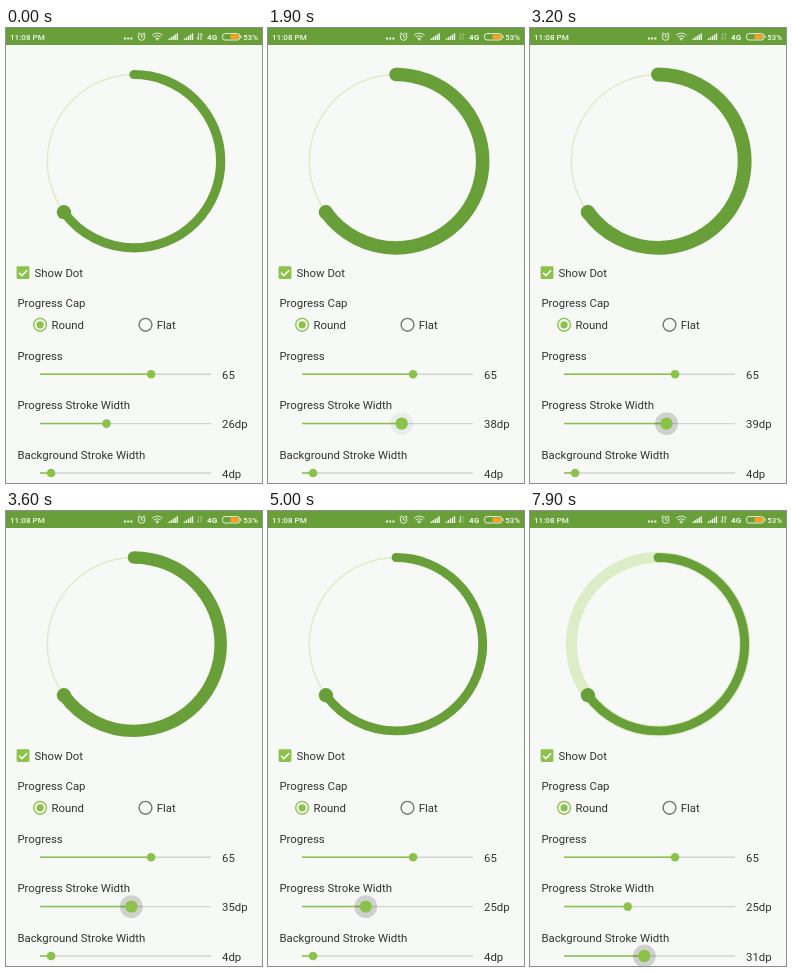
These frames come from a looping animation (256x455 px, 8000 ms). An HTML page:

```html
<!DOCTYPE html>
<html lang="en">
<head>
<meta charset="utf-8">
<title>Circular progress settings</title>
<style>
  html, body { margin: 0; width: 100%; height: 100%; overflow: hidden; background: #f7f9f6; }
  svg { display: block; width: 100vw; height: 100vh; }
  text { font: 11.38px Roboto, sans-serif; fill: #333; }
  .status text { font-size: 8.1px; font-weight: 500; fill: #f4f8ef; }
  .status .line { fill: none; stroke: #f4f8ef; stroke-width: 0.9; }
  .accent { fill: #8bc34a; }
  .line { fill: none; }
</style>
</head>
<body>
<svg viewBox="0 0 256 455">
  <g class="status">
    <rect width="256" height="17" fill="#689f38"/>
    <text x="4" y="11.6">11:08 PM</text>
    <path d="M118 10.5h2m1.2 0h2m1.2 0h2" class="line" style="stroke-width:1.8"/>
    <circle cx="135.6" cy="9" r="3.3" class="line"/>
    <path d="M135.6 7v2.2h1.6M131.6 6.2l2-1.6M139.6 6.2l-2-1.6" class="line"/>
    <path d="M146 7.2q5.3-4.2 10.6 0M147.7 9q3.6-2.8 7.2 0M149.4 10.7q1.9-1.5 3.8 0" class="line"/>
    <circle cx="151.3" cy="11.6" r="0.9" fill="#f4f8ef"/>
    <g id="signals" fill="#f4f8ef"></g>
    <path id="down" d="M192.4 5v6.5M190.9 9.8l1.5 1.9" class="line"/>
    <path id="up" d="M195 12V5.5M196.5 7.2l-1.5-1.9" class="line"/>
    <text x="201" y="11.6" style="font-weight:700">4G</text>
    <rect x="216.5" y="5.6" width="17.4" height="6.4" rx="2.4" class="line"/>
    <rect x="224.5" y="6.6" width="8.4" height="4.4" rx="1" fill="#ff9f1c"/>
    <path d="M235 7.5v2.6" class="line"/>
    <text x="237.3" y="11.5" style="font-size:7.8px">53%</text>
  </g>

  <g class="line" transform="rotate(-90 128 133.2)">
    <circle id="ringBack" cx="128" cy="133.2" r="86.7" stroke="#dcedc8"/>
    <circle id="ring" cx="128" cy="133.2" r="86.7" stroke="#689f38" pathLength="100"
      stroke-dasharray="65 100" stroke-linecap="round"/>
  </g>
  <circle cx="57.9" cy="184.2" r="7.1" fill="#689f38"/>

  <rect x="10.6" y="238.2" width="12.8" height="12.8" rx="1.4" class="accent"/>
  <path d="M13 244.7l2.9 2.9 5.3-5.4" class="line" stroke="#fff" stroke-width="1.5"/>
  <text x="28.5" y="249">Show Dot</text>
  <text x="11.4" y="279.3">Progress Cap</text>
  <circle cx="34.1" cy="296.8" r="6.4" class="line" stroke="#8bc34a" stroke-width="1.4"/>
  <circle cx="34.1" cy="296.8" r="3.6" class="accent"/>
  <text x="45.4" y="301">Round</text>
  <circle cx="139.5" cy="296.8" r="6.4" class="line" stroke="#737573" stroke-width="1.4"/>
  <text x="150.8" y="301">Flat</text>
  <g id="sliders"></g>
</svg>
<script>
const LOOP = 8000, TRACK_START = 34, TRACK_END = 205, STEP = 2.77, PX_PER_DP = 0.3556;
const $ = id => document.getElementById(id);
const clamp = x => Math.max(0, Math.min(1, x));

// Signal strength bars
for (const x of [162.5, 177.8])
  for (let i = 0; i < 5; i++) {
    const h = 1.5 + i * 1.3;
    $('signals').innerHTML += `<rect x="${x + i * 2}" y="${12 - h}" width="1.4" height="${h}"/>`;
  }

function makeSlider(label, y) {
  const group = document.createElementNS('http://www.w3.org/2000/svg', 'g');
  group.innerHTML = `
    <text x="11.4" y="${y - 14.4}">${label}</text>
    <path d="M${TRACK_START} ${y}H${TRACK_END}" stroke="#d2d4d1" stroke-width="1.4"/>
    <path stroke="#8bc34a" stroke-width="1.5"/>
    <circle cy="${y}" r="11.4" fill="#000"/>
    <circle cy="${y}" class="accent"/>
    <text x="216" y="${y + 4.6}"></text>`;
  $('sliders').append(group);
  const [, , filled, halo, thumb, value] = group.children;
  return (x, text, grow = 0, haloAlpha = 0) => {
    filled.setAttribute('d', `M${TRACK_START} ${y}H${x}`);
    halo.setAttribute('cx', x);
    halo.setAttribute('opacity', 0.16 * haloAlpha);
    thumb.setAttribute('cx', x);
    thumb.setAttribute('r', 4.3 + 1.9 * grow);
    value.textContent = text;
  };
}

const showProgress = makeSlider('Progress', 346.3);
const showStroke = makeSlider('Progress Stroke Width', 395.6);
const showBack = makeSlider('Background Stroke Width', 445);
showProgress(145.1, '65');

// [time, dp] pairs, linear in between
const strokeKeys = [[0, 26], [1699, 26], [1700, 37], [1900, 38], [2500, 41], [2700, 41],
  [3200, 39], [3600, 35], [3800, 34], [4200, 29], [4600, 26], [4800, 25], [LOOP, 25]];
const backKeys = [[0, 4], [7399, 4], [7400, 10], [7900, 31], [LOOP, 31]];

function valueAt(keys, t) {
  const i = keys.findIndex(([time]) => time > t);
  const [t0, v0] = keys[i - 1], [t1, v1] = keys[i];
  return Math.round(v0 + (v1 - v0) * (t - t0) / (t1 - t0));
}

function pressAt(t, down, up) {
  const fade = 1 - clamp((t - up) / 300);
  return [clamp((t - down) / 150) * fade, clamp((t - down - 80) / 250) * fade];
}

const sliderX = (dp, offset) => TRACK_START + STEP * (dp - offset);

function draw(t) {
  const stroke = valueAt(strokeKeys, t), back = valueAt(backKeys, t);
  $('ring').setAttribute('stroke-width', stroke * PX_PER_DP);
  $('ringBack').setAttribute('stroke-width', back * PX_PER_DP);
  showStroke(sliderX(stroke, 2), stroke + 'dp', ...pressAt(t, 1750, 5500));
  showBack(sliderX(back, t < 7400 ? 0 : 2), back + 'dp', ...pressAt(t, 7450, LOOP));

  const idle = t >= 1000 && t < 3800;
  $('down').style.opacity = idle ? 0.4 : 1;
  $('up').style.opacity = idle || (t >= 5000 && t < 6000) ? 0.4 : 1;
}

function tick() {
  draw(performance.now() % LOOP);
  requestAnimationFrame(tick);
}
tick();
</script>
</body>
</html>
```
